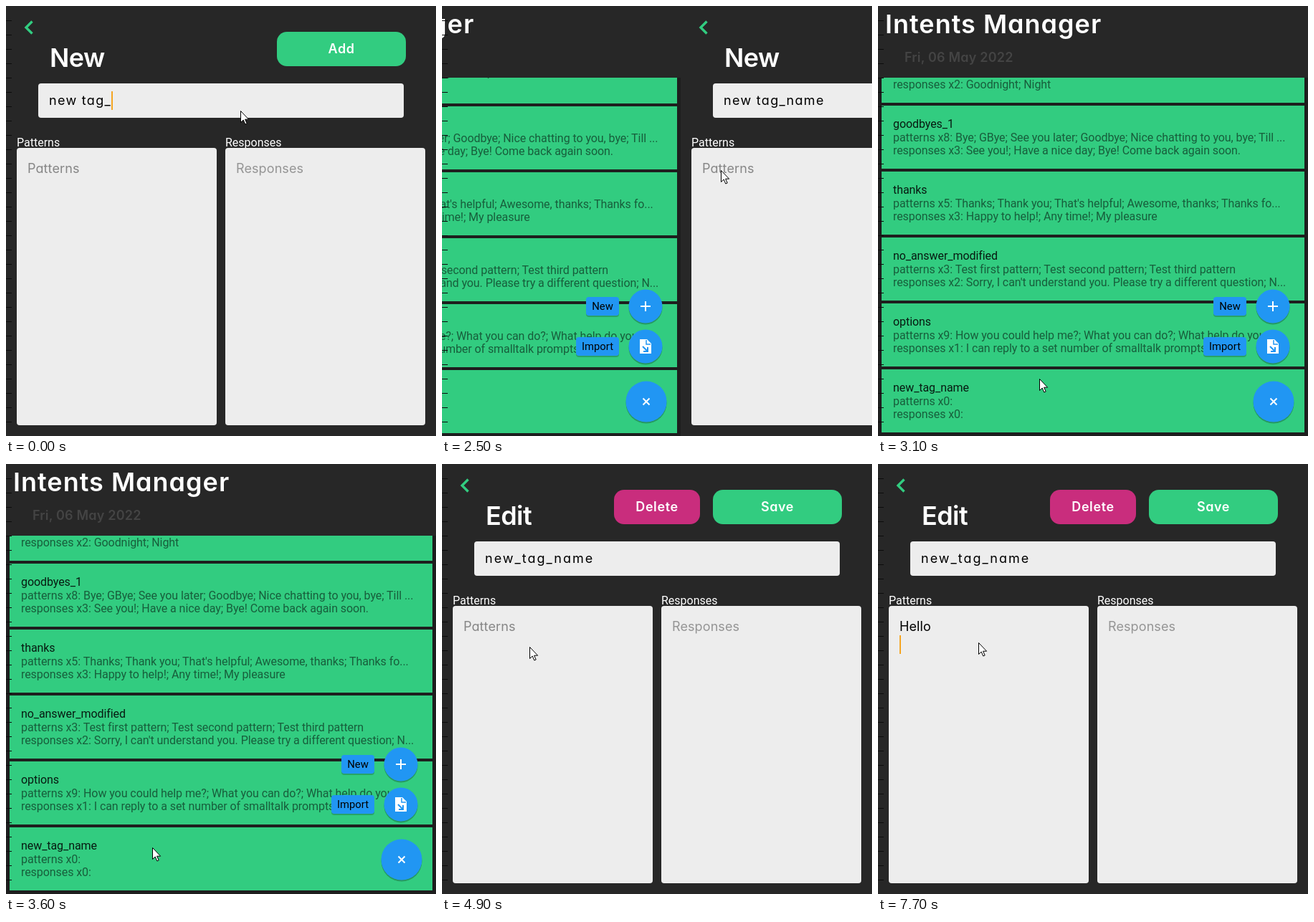
Animation, 600 px wide and 600 px high, one loop 8000 ms. Source, as an HTML page:

```html
<!DOCTYPE html>
<html lang="en">
<head>
<meta charset="utf-8">
<style>
html, body { margin: 0; width: 100%; height: 100%; overflow: hidden; background: #272727; }
svg { display: block; width: 100vw; height: 100vh; }
text { font: 16px Roboto, sans-serif; white-space: pre; }
.geo { font: 18px Inter, sans-serif; font-feature-settings: "cv11"; letter-spacing: .1px; }
.title { font-size: 36px; font-weight: 600; fill: #fff; letter-spacing: -.6px; }
.wide { letter-spacing: 1px; }
.button { font-weight: 600; fill: #fff; letter-spacing: .6px; text-anchor: middle; }
.field { letter-spacing: 1.3px; }
#editTag { letter-spacing: 2px; }
.label { fill: #fff; }
.date { font-weight: 600; fill: #444; letter-spacing: .2px; }
.row, .sub { fill: #000; fill-opacity: .87; letter-spacing: -.07px; }
.sub { fill-opacity: .54; }
.chip { font-size: 14.8px; text-anchor: middle; }
</style>
</head>
<body>
<svg id="stage" viewBox="0 0 600 600" xmlns="http://www.w3.org/2000/svg"></svg>
<script>
const GREEN = '#32cc80', PINK = '#c92d7d', BLUE = '#2196f3', BG = '#272727', PAPER = '#ededed';
const stage = document.getElementById('stage');
const $ = id => document.getElementById(id);

const box = (x, y, w, h, fill, r = 0) =>
  `<rect x="${x}" y="${y}" width="${w}" height="${h}" rx="${r}" fill="${fill}"/>`;
const label = (x, y, s, cls, extra = '') => `<text x="${x}" y="${y}" class="${cls}" ${extra}>${s}</text>`;
const button = (x, w, s, fill) => box(x, 36, w, 48, fill, 14) + label(x + w / 2, 66, s, 'geo button');
const caret = id => `<rect id="${id}" width="2" height="26" fill="#f5a623"/>`;

function form(id, title, buttons, tag) {
  return `<g id="${id}">` + box(0, 0, 600, 600, BG) +
    `<path d="M36.5 21.5L28 30l8.500 8.500" fill="none" stroke="${GREEN}" stroke-width="3.400"/>` +
    label(61, 85, title, 'geo title') + buttons +
    box(45, 108, 510, 48, PAPER, 4) + label(60, 138, tag, 'geo field', `id="${id}Tag"`) +
    label(15, 196, 'Patterns', 'label') + label(306, 196, 'Responses', 'label') +
    box(15, 198, 279, 387, PAPER, 4) + box(306, 198, 279, 387, PAPER, 4) +
    label(30, 233, 'Patterns', 'geo', `id="${id}Patterns" fill="#868686"`) +
    label(321, 233, 'Responses', 'geo', 'fill="#959595"') + caret(id + 'Caret') + '</g>';
}

const intents = [
  ['goodnight', 'patterns x4: Night; Good night; Going to sleep', 'responses x2: Goodnight; Night'],
  ['goodbyes_1', 'patterns x8: Bye; GBye; See you later; Goodbye; Nice chatting to you, bye; Till ...',
    'responses x3: See you!; Have a nice day; Bye! Come back again soon.'],
  ['thanks', "patterns x5: Thanks; Thank you; That's helpful; Awesome, thanks; Thanks fo...",
    'responses x3: Happy to help!; Any time!; My pleasure'],
  ['no_answer_modified', 'patterns x3: Test first pattern; Test second pattern; Test third pattern',
    "responses x2: Sorry, I can't understand you. Please try a different question; N..."],
  ['options', 'patterns x9: How you could help me?; What you can do?; What help do you ...',
    'responses x1: I can reply to a set number of smalltalk prompts'],
  ['new_tag_name', 'patterns x0:', 'responses x0:']
];
const row = ([name, patterns, responses], i) => {
  const y = 47 + i * 92;
  return box(5, y, 590, 88, GREEN) +
    (i === 5 ? '<circle id="ripple" cx="204" cy="544" fill="#78c59d" clip-path="url(#lastRow)"/>' : '') +
    label(21, y + 31, name, 'row') + label(21, y + 50, patterns, 'sub') + label(21, y + 68, responses, 'sub');
};

const disc = (x, y, r, icon) =>
  `<circle cx="${x}" cy="${y + 2}" r="${r}" fill="#000" opacity=".25"/>` +
  `<circle cx="${x}" cy="${y}" r="${r}" fill="${BLUE}"/>` +
  `<g transform="translate(${x} ${y})" stroke="#fff" stroke-width="2" fill="none">${icon}</g>`;
const chip = (x, y, w, s) => box(x, y + 2, w, 26, '#0003', 4) + box(x, y, w, 26, BLUE, 4) +
  label(x + w / 2, y + 18, s, 'chip');
const fileIcon = '<path d="M-8-10H2l6 6V10H-8z" fill="#fff" stroke="none"/>' +
  `<path d="M1-9v6h6" stroke="${BLUE}" stroke-width="1.500"/>` +
  `<path d="M-4 0l6 6M3 1v6h-6" stroke="${BLUE}"/>`;

const list = '<g id="list">' + box(0, 0, 600, 600, '#1e1e1e') +
  '<clipPath id="lastRow"><rect x="5" y="507" width="590" height="88"/></clipPath>' +
  `<g id="rows">${intents.map(row).join('')}</g>` + box(0, 0, 600, 100, BG) +
  label(10, 38, 'Intents Manager', 'geo title wide') +
  label(37, 78, 'Fri, 06 May 2022', 'geo date') +
  chip(468, 406, 46, 'New') + chip(454, 462, 60, 'Import') +
  disc(551, 419, 23.5, '<path d="M-7 0H7M0-7V7"/>') + disc(551, 475, 23.5, fileIcon) +
  disc(552, 552, 28.5, '<path d="M-4.500-4.500l9 9M4.500-4.500l-9 9"/>') + '</g>';

let ticks = '';
for (let y = 20; y < 600; y += 20) ticks += `M0 ${y + .5}h8`;

stage.innerHTML =
  form('create', 'New', button(378, 180, 'Add', GREEN), 'new tag_') + list +
  form('edit', 'Edit', button(240, 120, 'Delete', PINK) + button(378, 180, 'Save', GREEN), 'new_tag_name') +
  `<path d="${ticks}" stroke="#0c0c0c"/>` +
  '<path id="mouse" d="M.5.5v16l3.700-3.500 2.600 6 2.400-1-2.600-5.800h5z" fill="#fff" stroke="#000"/>';

const clamp = v => Math.max(0, Math.min(1, v));
const outQuad = p => 1 - (1 - p) ** 2;
const slide = (t, start) => outQuad(clamp((t - start) / 400));
const move = (id, x, y = 0) => $(id).setAttribute('transform', `translate(${x} ${y})`);

const mousePath = [
  [0, 327, 146], [1600, 327, 146], [1900, 396, 96], [2150, 440, 62], [2350, 440, 62],
  [2700, 320, 451], [3000, 232, 515], [3400, 204, 535], [4400, 204, 535],
  [4900, 122, 255], [6000, 122, 255], [6500, 140, 249], [8000, 140, 249]
];
function mouseAt(t) {
  const i = mousePath.findIndex(k => k[0] > t);
  const [t0, x0, y0] = mousePath[i - 1], [t1, x1, y1] = mousePath[i];
  const p = (t - t0) / (t1 - t0);
  return [Math.round(x0 + (x1 - x0) * p), Math.round(y0 + (y1 - y0) * p)];
}

const tagKeys = [-400, 400, 500, 600, 700];
const helloKeys = [5500, 6800, 7000, 7200, 7300, 7500, 7700];
// The first entry is the focus time; each later one is a key press.
const pressed = (keys, t) => keys.filter(k => k <= t).length - 1;

function showCaret(id, keys, n, x, y, t) {
  const on = n >= 0 && (t - keys[n]) % 1000 < 500;
  $(id).setAttribute('visibility', on ? 'visible' : 'hidden');
  move(id, Math.round(x), y);
}

function draw(t) {
  const back = slide(t, 2367), open = slide(t, 4093);
  move('create', Math.round(600 * back));
  move('list', Math.round(600 * (back - 1 - open)));
  move('edit', Math.round(600 * (1 - open)));
  move('rows', 0, t < 2900 ? 1 : 0);
  $('ripple').setAttribute('r', 420 * clamp((t - 3750) / 400));

  const tag = $('createTag'), typed = pressed(tagKeys, t);
  tag.textContent = 'new tag_name'.slice(0, 8 + typed);
  showCaret('createCaret', tagKeys, typed, 60 + tag.getComputedTextLength(), 119, t);

  const hello = $('editPatterns'), n = pressed(helloKeys, t), newLine = n > 5;
  hello.textContent = n > 0 ? 'Hello'.slice(0, n) : 'Patterns';
  hello.setAttribute('fill', n > 0 ? '#000' : '#868686');
  const width = n > 0 && !newLine ? hello.getComputedTextLength() : 0;
  showCaret('editCaret', helloKeys, n, 30 + width, newLine ? 239 : 214, t);

  move('mouse', ...mouseAt(t));
}

function tick() {
  draw(Math.floor(performance.now() % 8000 / 100) * 100);
  requestAnimationFrame(tick);
}
tick();
</script>
</body>
</html>
```
